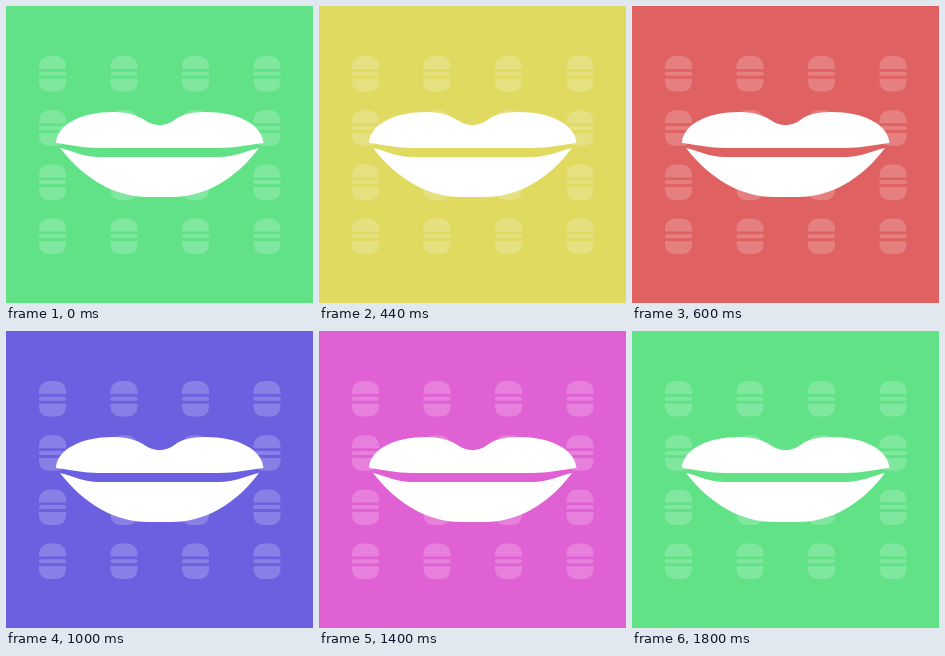
An HTML page for the animation above (2 s loop, 307 px wide and 297 px high).

```html
<!DOCTYPE html>
<html lang="en">
<head>
<meta charset="utf-8">
<title>Lips</title>
<style>
  html, body { margin: 0; width: 100%; height: 100%; overflow: hidden; }
  svg { display: block; width: 100%; height: 100%; }
</style>
</head>
<body>
<svg id="stage" viewBox="0 0 307 297">
  <defs>
    <g id="burger">
      <path d="M0 13V11C0 4 4.500 0 11 0H16C22.500 0 27 4 27 11V13Z"/>
      <rect y="15.700" width="27" height="4" rx="1.500"/>
      <path d="M0 22.700H27V25C27 31.500 23 35.500 17 35.500H10C4 35.500 0 31.500 0 25Z"/>
    </g>
  </defs>
  <g id="pattern" fill="#fff" fill-opacity=".2"></g>
  <g fill="#fff">
    <path d="M50 137C51 118 76 106 107 106C123 106 133 110 140 115C148 120.500 159 120.500 167 115C174 109 184 106 200 106C231 106 256 118 257.500 137C240 139 229 142 213 142H93C78 142 67 139 50 137Z"/>
    <path d="M54 142C68 145 77 151 93 151H213C229 151 239 145 253 142C229 174 198 191 166 191H142C110 191 79 174 54 142Z"/>
  </g>
</svg>
<script>
  const stage = document.getElementById('stage');
  const pattern = document.getElementById('pattern');

  for (let row = 0; row < 4; row++) {
    for (let col = 0; col < 4; col++) {
      const burger = document.createElementNS('http://www.w3.org/2000/svg', 'use');
      burger.setAttribute('href', '#burger');
      burger.setAttribute('x', 33 + col * 71.5);
      burger.setAttribute('y', 50 + row * 54.2);
      pattern.append(burger);
    }
  }

  const duration = 2000;
  const steps = [
    [0, '#61e286'],
    [200, '#e0da61'],
    [600, '#e06161'],
    [1000, '#6b61e0'],
    [1400, '#e061d4'],
    [1800, '#61e286'],
    [2000, '#61e286']
  ];

  stage.animate(
    steps.map(([time, backgroundColor]) => ({
      offset: time / duration, backgroundColor, easing: 'step-end'
    })),
    { duration, iterations: Infinity }
  );
</script>
</body>
</html>
```
